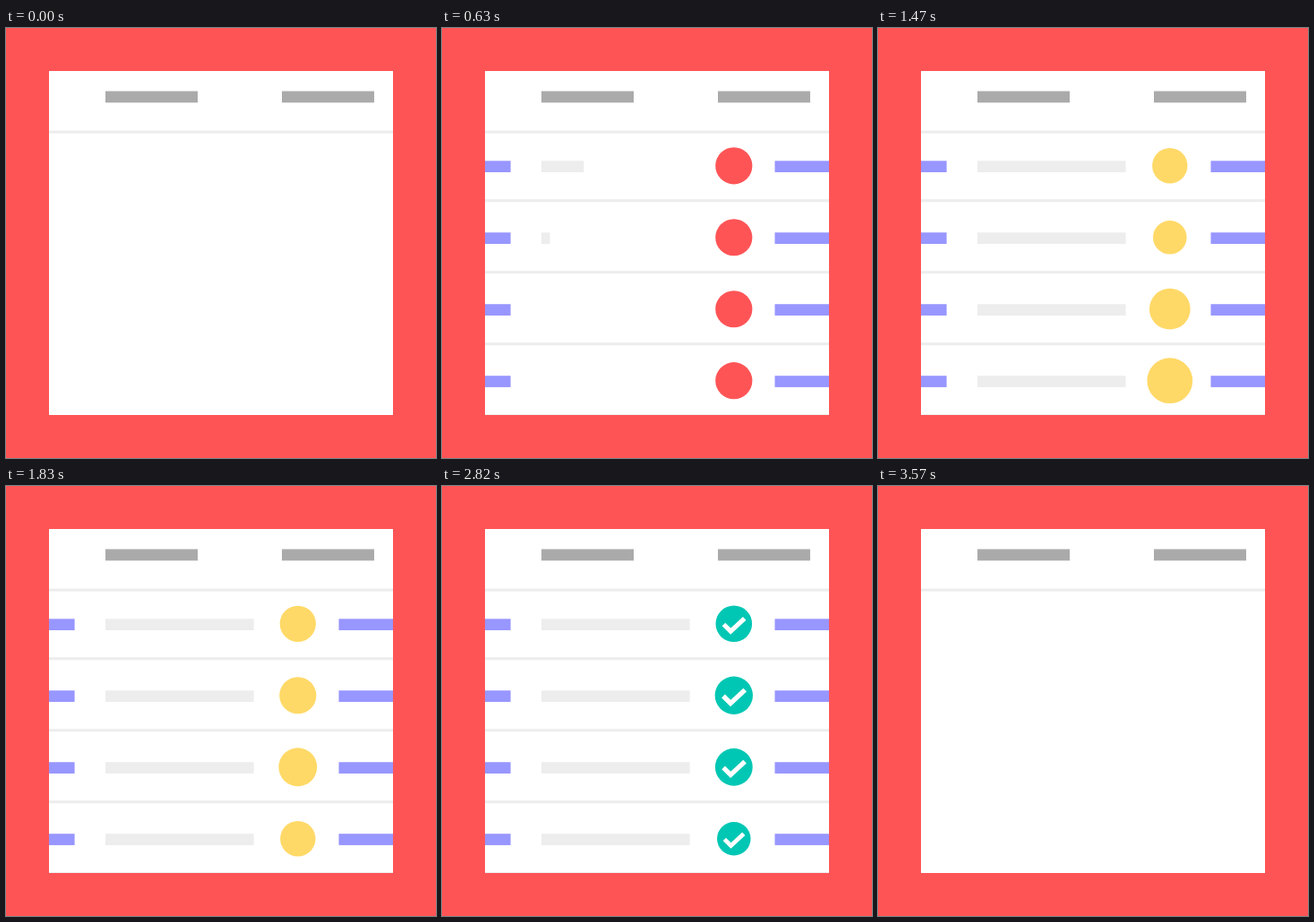
These frames come from a looping animation (480 px wide and 480 px high, 3.6 s). An HTML page with a canvas:

```html
<!DOCTYPE html>
<html>
<head>
<meta charset="utf-8">
<title>Checklist</title>
<style>
  html, body { margin: 0; width: 100%; height: 100%; overflow: hidden; background: #ff5456; }
  canvas { display: block; }
</style>
</head>
<body>
<canvas id="stage" width="480" height="480"></canvas>
<script>
const ctx = document.getElementById('stage').getContext('2d');
const LOOP = 3600, STEP = 30;
const ROWS = 4, STAGGER = 120, TRAVEL = 305;
const RED = '#ff5456', YELLOW = '#ffd967', TEAL = '#00c7b4';
const BLUE = '#9896ff', GRAY = '#aaaaaa', LIGHT = '#ededed';

// One status change: shrink a little, pop, then ring out. [time, radius offset]
const SWITCH = 1000, NEXT = 1050;
const pulse = [[720, 0], [1000, -2], [1120, 4.9], [1380, -2], [1590, 0.85], [1770, -0.3]];
const radiusKeys = [
  ...pulse,
  ...pulse.slice(1).map(([t, v]) => [t + NEXT, v]),
  [2950, 0]
];

const progress = (t, start, duration) => Math.min(1, Math.max(0, (t - start) / duration));
const ease = u => (1 - Math.cos(Math.PI * u)) / 2;

function keyed(keys, t) {
  let value = keys[0][1];
  for (let k = 1; k < keys.length; k++) {
    const [t0, v0] = keys[k - 1], [t1, v1] = keys[k];
    value += (v1 - v0) * ease(progress(t, t0, t1 - t0));
  }
  return value;
}

function rect(color, x, y, w, h) {
  ctx.fillStyle = color;
  ctx.fillRect(x, y, w, h);
}

function drawStatus(y, t) {
  const radius = 20.6 + keyed(radiusKeys, t);
  const done = t >= SWITCH + NEXT;
  ctx.save();
  ctx.translate(325.8, y);
  ctx.scale(radius / 20.6, radius / 20.6);
  ctx.fillStyle = done ? TEAL : t >= SWITCH ? YELLOW : RED;
  ctx.beginPath();
  ctx.arc(0, 0, 20.6, 0, 2 * Math.PI);
  ctx.fill();
  if (done) {
    ctx.strokeStyle = '#fff';
    ctx.lineWidth = 5.2;
    ctx.beginPath();
    ctx.moveTo(-11.5, 0.7);
    ctx.lineTo(-3.6, 8.5);
    ctx.lineTo(12.1, -6);
    ctx.stroke();
  }
  ctx.restore();
}

function drawRow(i, time) {
  const t = time - i * STAGGER;
  const enter = 1 - ease(progress(t, 0, 240));
  const leave = progress(time, 3345 - 65 * i, 192) ** 2.5;
  const y = 153.8 + 79.97 * i + TRAVEL * (enter + leave);
  rect(BLUE, 48, y - 5.5, 28.6, 12.7);
  rect(BLUE, 371.5, y - 5.5, 60.5, 12.7);
  rect(LIGHT, 111, y - 5.5, 165.6 * ease(progress(t, 420, 585)), 12.7);
  rect(LIGHT, 48, y + 37.4, 384, 3.1);
  drawStatus(y, t);
}

function draw(time) {
  rect(RED, 0, 0, 480, 480);
  rect('#fff', 48, 48, 384, 384);
  rect(GRAY, 111, 70.5, 103, 12.8);
  rect(GRAY, 308, 70.5, 103, 12.8);
  rect(LIGHT, 48, 114.5, 384, 3.1);
  ctx.save();
  ctx.beginPath();
  ctx.rect(48, 48, 384, 384);
  ctx.clip();
  for (let i = 0; i < ROWS; i++) drawRow(i, time);
  ctx.restore();
}

function tick() {
  draw(Math.floor(performance.now() % LOOP / STEP) * STEP);
  requestAnimationFrame(tick);
}
tick();
</script>
</body>
</html>
```
